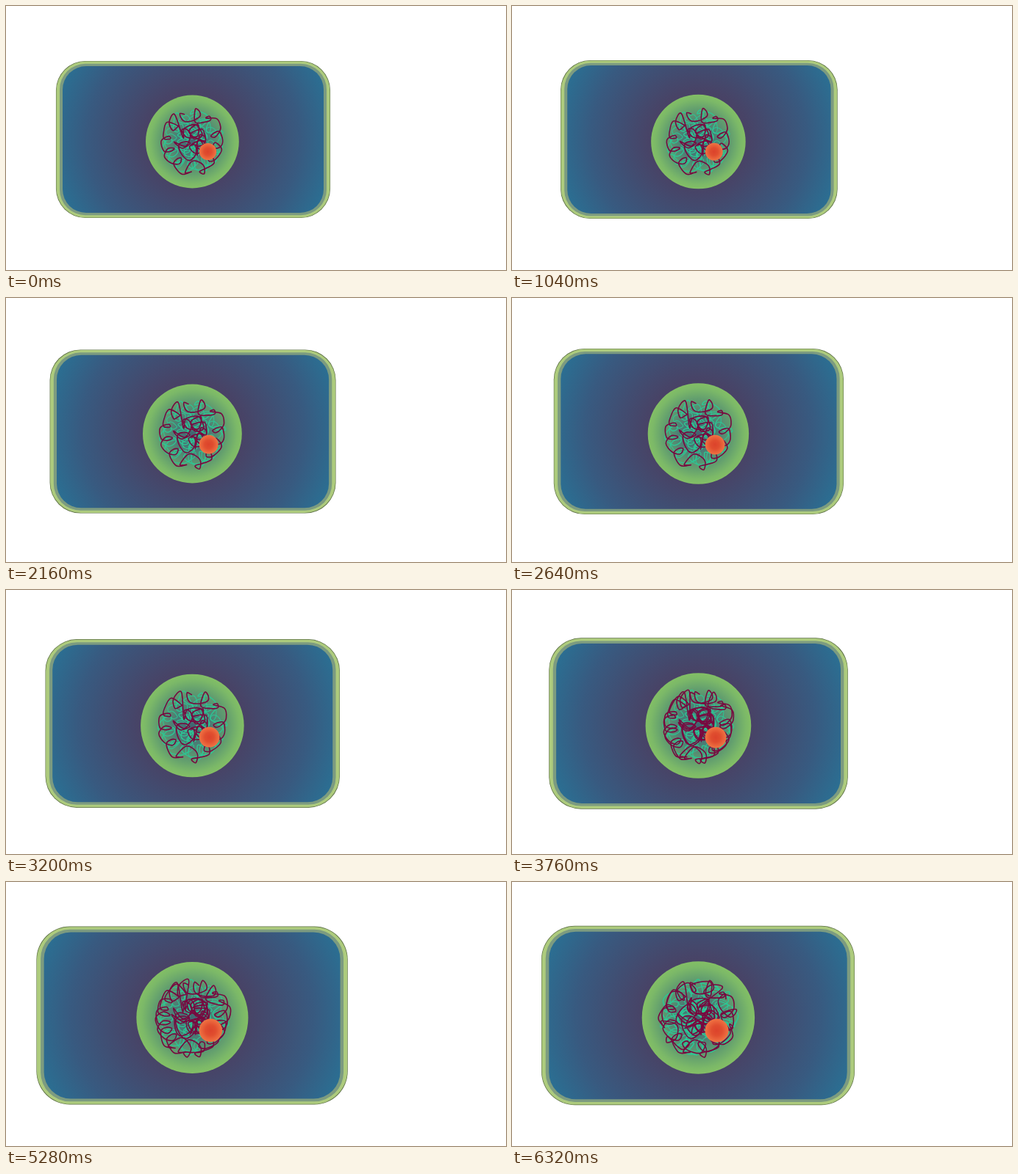
Animation of 680 by 360 pixels, one loop 6.4 s. Source, as an HTML page with a canvas:

```html
<!DOCTYPE html>
<html lang="en">
<head>
<meta charset="utf-8">
<title>Growing cell</title>
<style>
html, body { margin: 0; width: 100%; height: 100%; overflow: hidden; background: #fff; }
canvas { display: block; }
</style>
</head>
<body>
<canvas id="stage" width="680" height="360"></canvas>
<script>
const ctx = document.getElementById('stage').getContext('2d');
const LOOP = 6400, HOLD = 800, STEP = 80, STEPS = 60, SPLIT_AT = 6320;
const TAU = Math.PI * 2;
const PURPLE = '#78083f', TEAL = '#2cc795';

const mix = (a, b, p) => a + (b - a) * p;
const clamp = v => Math.max(0, Math.min(1, v));

function random(seed) {
  return () => {
    seed = (seed * 16807) % 2147483647;
    return seed / 2147483647;
  };
}

// Curls strung along a circle of the given radius
function curls(rand, count, ring, size, turns) {
  const points = [];
  let phase = rand() * TAU, bend = 1;
  for (let i = 0; i < count; i++) {
    const a = TAU * turns * i / count - 2;
    if (i % 6 === 0) bend = rand() < 0.7 ? 1 : -1;
    phase += bend * mix(0.9, 1.7, rand());
    const r = ring + mix(-3, 3, rand()), c = size * mix(0.7, 1.25, rand());
    points.push([r * Math.cos(a) + c * Math.cos(phase), r * Math.sin(a) + c * Math.sin(phase)]);
  }
  return points;
}

// A thread runs once round the rim, then tangles in the middle
function makeThread(seed) {
  const rand = random(seed);
  const p = [...curls(rand, 58, 36, 8.5, 1), ...curls(rand, 44, 14, 9, 1.6)];
  const path = new Path2D();
  const at = i => p[Math.max(0, Math.min(p.length - 1, i))];
  path.moveTo(...p[0]);
  for (let i = 0; i < p.length - 1; i++) {
    const [a, b, c, d] = [at(i - 1), at(i), at(i + 1), at(i + 2)];
    path.bezierCurveTo(
      b[0] + (c[0] - a[0]) / 6, b[1] + (c[1] - a[1]) / 6,
      c[0] - (d[0] - b[0]) / 6, c[1] - (d[1] - b[1]) / 6, ...c);
  }
  return path;
}

const thread = makeThread(7411);
const backThread = makeThread(90217);

function radial(x, y, r, stops) {
  const g = ctx.createRadialGradient(x, y, 0, x, y, r);
  stops.forEach(([at, color]) => g.addColorStop(at, color));
  return g;
}

function disc(x, y, r, stops) {
  ctx.fillStyle = radial(x, y, r, stops);
  ctx.beginPath();
  ctx.arc(x, y, r, 0, TAU);
  ctx.fill();
}

function panel(x, y, w, h, r, fill) {
  ctx.fillStyle = fill;
  ctx.beginPath();
  ctx.roundRect(x - w / 2, y - h / 2, w, h, r);
  ctx.fill();
}

function strand(path, x, y, scale, degrees, color, width) {
  ctx.save();
  ctx.translate(x, y);
  ctx.rotate(degrees * Math.PI / 180);
  ctx.scale(scale, scale);
  ctx.strokeStyle = color;
  ctx.lineWidth = width / scale;
  ctx.lineCap = ctx.lineJoin = 'round';
  ctx.stroke(path);
  ctx.restore();
}

function drawCell(p) {
  const x = mix(254.5, 253, p), y = 182;
  const s = mix(1, 1.142, p);
  const w = 372.5 * s, h = 213.5 * s;
  panel(x, y, w + 0.6, h + 0.6, 40 * s, '#5c6f45');
  panel(x, y, w - 0.6, h - 0.6, 40 * s, '#adcb7d');
  panel(x, y, w - 9.5 * s, h - 7 * s, 35 * s, '#7c9b80');
  panel(x, y, w - 17.5 * s, h - 13.5 * s, 32 * s,
    radial(x, y, 208 * s, [[0, '#4d3c60'], [0.32, '#484366'], [0.7, '#385a80'], [1, '#277598']]));
}

function drawThreads(x, y, p, split) {
  const scale = mix(1, 1.17, p), turn = 29 * p;
  const apart = split ? 1 : clamp((p - 0.52) / 0.25);
  strand(backThread, x, y, scale * 0.95, turn, TEAL, 1.3);
  strand(backThread, x, y + 2, scale * 0.85, turn + 140, TEAL, 1);
  if (split) strand(thread, x, y, scale, 250, TEAL, 1.6);
  strand(thread, x, y, scale, split ? 72 : turn, PURPLE, 1.6);
  if (apart > 0) strand(thread, x, y, scale, turn - 18 * apart, PURPLE, 1.6);
}

function draw(t) {
  const step = t < HOLD ? 0 : Math.min(STEPS, Math.floor((t - HOLD) / STEP) + 1);
  const p = step / STEPS;
  const x = 253.4, y = 185;
  ctx.fillStyle = '#fff';
  ctx.fillRect(0, 0, 680, 360);
  drawCell(p);
  disc(x, y, mix(63.4, 76.7, p),
    [[0, '#426572'], [0.35, '#4a7c75'], [0.7, '#639f6e'], [0.9, '#7bb868'], [1, '#83bf65']]);
  drawThreads(x, y, p, t >= SPLIT_AT);
  disc(mix(274.5, 278.5, p), mix(198.5, 202.5, p), mix(11.6, 16, p),
    [[0, '#dc432b'], [0.45, '#e04e2f'], [0.75, '#e9623a'], [1, '#ee7443']]);
}

const start = performance.now();
function tick() {
  draw((performance.now() - start) % LOOP);
  requestAnimationFrame(tick);
}
tick();
</script>
</body>
</html>
```
